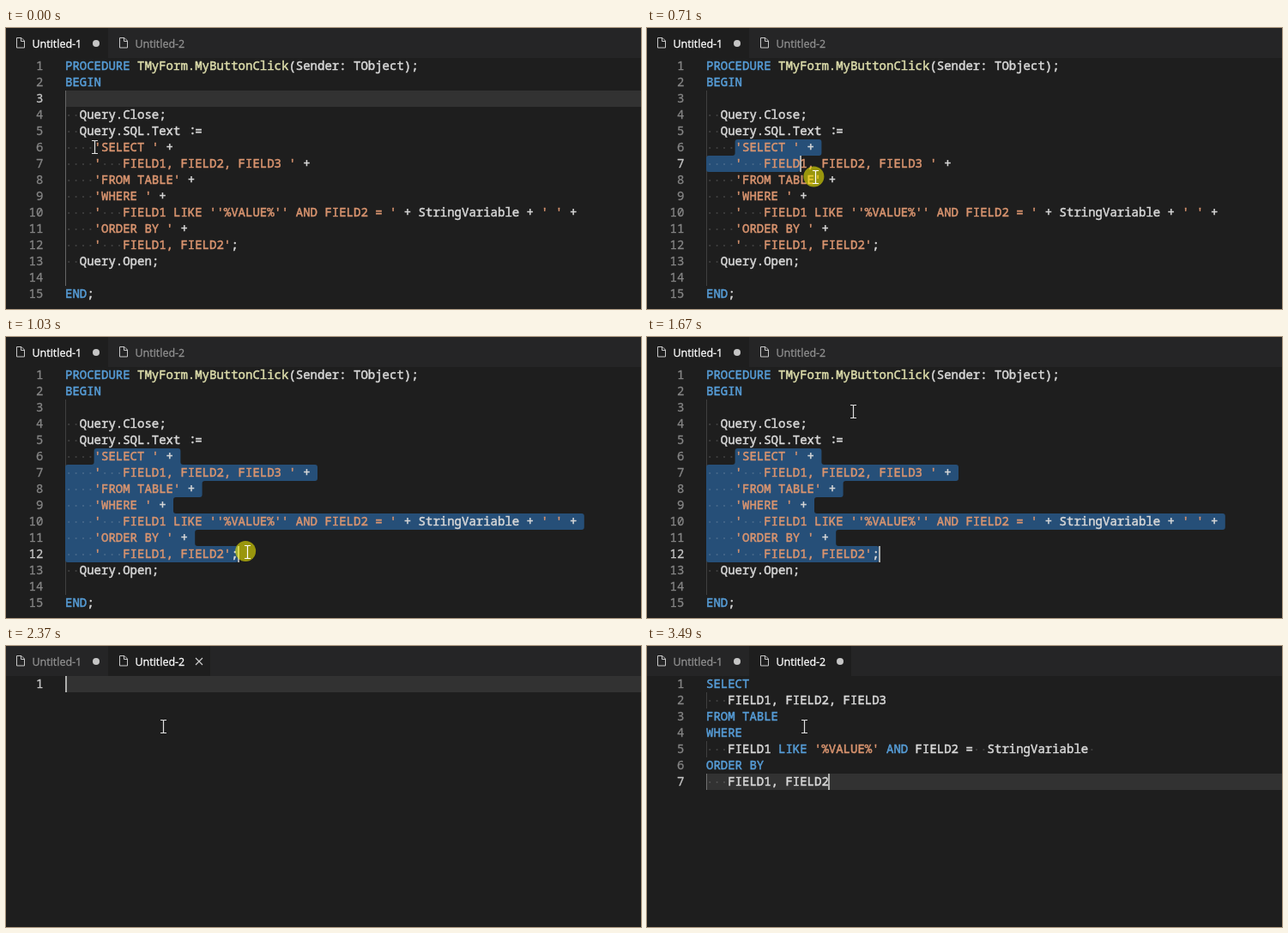
An HTML page that plays this animation: 740 px wide and 328 px high, repeating every 4.29 s.

```html
<!DOCTYPE html>
<html lang="en">
<head>
<meta charset="utf-8">
<title>Editor</title>
<style>
  html, body { margin: 0; width: 100%; height: 100%; overflow: hidden; background: #1e1e1e; }
  svg { display: block; width: 740px; height: 328px; }
  text { white-space: pre; font-variant-ligatures: none; }
  .code { font: 500 14px "Noto Sans Mono", "DejaVu Sans Mono", monospace; }
  .tab { font: 12.5px "Open Sans", "Noto Sans", sans-serif; }
  #texts text { stroke-width: .5; }
  #over text, #tabs text { stroke-width: .3; }
</style>
</head>
<body>
<svg id="stage" viewBox="0 0 740 328">
  <rect width="740" height="328" fill="#1e1e1e"/>
  <g id="tabs"></g>
  <g id="under"></g>
  <g id="texts" class="code"></g>
  <g id="over" class="code"></g>
  <circle id="press" r="12" fill="#faf500" fill-opacity=".56"/>
  <path id="beam" d="M-3.5 -7.5H-1Q0 -7.5 0 -6.5Q0 -7.5 1 -7.5H3.5M0 -7V7M-3.5 7.5H-1Q0 7.5 0 6.5Q0 7.5 1 7.5H3.5" fill="none" stroke="#fff" stroke-width="1.2"/>
  <path id="arrow" d="M0 0V16L3.7 12.6L6.2 18.4L8.6 17.3L6.1 11.7H11Z" fill="#fff" stroke="#000" stroke-width=".8"/>
</svg>
<script>
const LOOP = 4290, LEFT = 69, TOP = 35, ROW = 19, CW = 8.4;
const $ = id => document.getElementById(id);

const query = [
  "'SELECT ' +",
  "    '   FIELD1, FIELD2, FIELD3 ' +",
  "    'FROM TABLE' +",
  "    'WHERE ' +",
  "    '   FIELD1 LIKE ''%VALUE%'' AND FIELD2 = ' + StringVariable + ' ' +",
  "    'ORDER BY ' +",
  "    '   FIELD1, FIELD2';"
];
const docs = [
  ["PROCEDURE TMyForm.MyButtonClick(Sender: TObject);", "BEGIN", "",
   "  Query.Close;", "  Query.SQL.Text :=", "    " + query[0], ...query.slice(1),
   "  Query.Open;", "", "END;"],
  [""],
  query,
  ["SELECT", "   FIELD1, FIELD2, FIELD3", "FROM TABLE", "WHERE",
   "   FIELD1 LIKE '%VALUE%' AND FIELD2 =  StringVariable ", "ORDER BY", "   FIELD1, FIELD2"]
];
const guides = [[2, 13], null, [1, 6], null];

const TOKEN = /'[^']*'|\b(?:PROCEDURE|BEGIN|END|SELECT|FROM|TABLE|WHERE|LIKE|AND|ORDER|BY)\b|TMyForm\.MyButtonClick|[^\s']+?(?=[\s']|$)/g;
const colX = c => LEFT + c * CW;
const rowY = r => TOP + r * ROW;
const rect = (x, y, w, h, fill) => `<rect x="${x}" y="${y}" width="${w}" height="${h}" fill="${fill}"/>`;
const esc = s => s.replace(/&/g, "&amp;").replace(/</g, "&lt;");
const text = (x, y, s, ink, more = "") =>
  `<text x="${x.toFixed(2)}" y="${y}" fill="${ink}" stroke="${ink}" ${more}>${esc(s)}</text>`;

function tint(word) {
  if (word[0] === "'") return "#d9946f";
  if (word.startsWith("TMyForm")) return "#dcdcaa";
  return /^[A-Z]{2,}$/.test(word) ? "#569cd6" : "#d8d8d8";
}

function drawLine(line, r) {
  const y = rowY(r) + 14;
  let out = "";
  for (const m of line.matchAll(TOKEN)) {
    if (m[0] === ":=") {
      out += text(colX(m.index) + 1.5, y - 1, ":", "#d8d8d8") + text(colX(m.index + 1), y, "=", "#d8d8d8");
    } else out += text(colX(m.index), y, m[0], tint(m[0]));
  }
  // dots for leading, trailing and repeated blanks
  for (const m of line.matchAll(/^ +| +$| {2,}/g))
    for (let c = m.index; c < m.index + m[0].length; c++)
      out += `<circle cx="${(colX(c) + CW / 2).toFixed(2)}" cy="${rowY(r) + 10}" r="1.1" fill="#e3e4e2" fill-opacity=".18"/>`;
  return out;
}

$("texts").innerHTML = docs.map(d => `<g>${d.map(drawLine).join("")}</g>`).join("");
const layers = [...$("texts").children];

function selection(doc, from, to) {
  const rows = [];
  for (let r = from.r; r <= to.r; r++) {
    const a = r === from.r ? from.c : 0;
    const b = r === to.r ? to.c : doc[r].length + 1;
    if (b > a) rows.push({ r, a: colX(a), b: colX(b) });
  }
  const R = 3;
  let d = "";
  rows.forEach((s, i) => {
    const p = rows[i - 1], n = rows[i + 1], y = rowY(s.r), e = y + ROW;
    const tl = !p || p.a > s.a ? R : 0, tr = !p || p.b < s.b ? R : 0;
    const br = !n || n.b < s.b ? R : 0, bl = !n || n.a > s.a ? R : 0;
    d += `M${s.a + tl} ${y}H${s.b - tr}q${tr} 0 ${tr} ${tr}V${e - br}q0 ${br} ${-br} ${br}H${s.a + bl}q${-bl} 0 ${-bl} ${-bl}V${y + tl}q0 ${-tl} ${tl} ${-tl}Z`;
    if (p && p.b > s.b) d += `M${s.b} ${y}h${R}q${-R} 0 ${-R} ${R}Z`;
    if (n && n.b > s.b) d += `M${s.b} ${e}h${R}q${-R} 0 ${-R} ${-R}Z`;
    if (n && n.a < s.a) d += `M${s.a} ${e}h${-R}q${R} 0 ${R} ${-R}Z`;
  });
  return `<path d="${d}" fill="#264f78"/>`;
}

// pointer route: time, x, y
const route = [
  [0, 103, 139], [460, 103, 139], [710, 196, 174], [850, 252, 289], [945, 267, 240],
  [1030, 281, 251], [1120, 293, 258], [1340, 293, 258], [1670, 240, 87], [1850, 210, 56],
  [2010, 180, 22], [2110, 180, 22], [2370, 183, 94], [LOOP, 183, 94]
];

function slope(i, k) {
  const a = route[i - 1], b = route[i], c = route[i + 1];
  if (!a || !c || (b[k] - a[k]) * (c[k] - b[k]) <= 0) return 0;
  return (c[k] - a[k]) / (c[0] - a[0]);
}

function pointer(t) {
  let i = 0;
  while (i < route.length - 2 && t >= route[i + 1][0]) i++;
  const a = route[i], b = route[i + 1], len = b[0] - a[0], s = (t - a[0]) / len;
  const s2 = s * s, s3 = s2 * s;
  return [1, 2].map(k => a[k] + (b[k] - a[k]) * (3 * s2 - 2 * s3)
    + len * ((s3 - 2 * s2 + s) * slope(i, k) + (s3 - s2) * slope(i + 1, k)));
}

function caretAt([x, y], doc) {
  const r = Math.max(0, Math.min(doc.length - 1, Math.floor((y - TOP) / ROW)));
  return { r, c: Math.max(0, Math.min(doc[r].length, Math.round((x - LEFT) / CW))) };
}

function tab(i, active, mark) {
  const x = i * 120;
  let out = active ? rect(i * 119, 0, 119, TOP, "#1e1e1e") : "";
  out += `<path d="M${x + 12.5} 11.5h5.5l3.5 3.5v8h-9zM${x + 17.5} 11.5v4h4" fill="none" stroke="#c8c8c8"/>`;
  out += text(x + 30.5, 22.5, "Untitled-" + (i + 1), active ? "#ffffff" : "#919191", 'class="tab"');
  if (mark === "dot") out += `<circle cx="${x + 105}" cy="18" r="4" fill="#c5c5c5"/>`;
  if (mark === "close") out += `<path d="M${x + 101} 14l8 8m0 -8l-8 8" stroke="#d0d0d0" stroke-width="1.1"/>`;
  return out;
}

const show = (el, on) => el.style.display = on ? "" : "none";

function draw(t) {
  const scene = t < 2060 ? 0 : t < 2710 ? 1 : t < 3490 ? 2 : 3;
  const doc = docs[scene], last = doc.length - 1;
  const start = { r: 5, c: 4 };
  let caret = { r: last, c: doc[last].length }, picked = false;
  if (scene === 0) {
    caret = t < 480 ? { r: 2, c: 0 } : caretAt(pointer(Math.min(t, 1100) - 40), doc);
    picked = t >= 480 && (caret.r > start.r || caret.c > start.c);
  }

  $("tabs").innerHTML = rect(0, 0, 740, TOP, "#252526")
    + tab(0, scene === 0, "dot")
    + tab(1, scene > 0, scene === 0 ? "" : t < 2740 ? "close" : "dot");

  let under = picked ? "" : rect(LEFT, rowY(caret.r), 740 - LEFT, ROW, "#323232");
  const g = guides[scene];
  if (g) under += rect(LEFT, rowY(g[0]), 1, (g[1] - g[0] + 1) * ROW, picked ? "#404040" : "#666666");
  if (scene === 3)
    for (const r of [1, 4, 6]) under += rect(LEFT, rowY(r), 1, ROW, r === 6 ? "#707070" : "#404040");
  if (picked) under += selection(doc, start, caret);
  $("under").innerHTML = under;

  layers.forEach((el, i) => show(el, i === scene));

  let over = doc.map((_, r) => text(43.4, rowY(r) + 14, String(r + 1),
    r === caret.r ? "#c6c6c6" : "#858585", 'text-anchor="end"')).join("");
  if (t >= 480) over += rect(Math.floor(colX(caret.c)), rowY(caret.r), 2, ROW, "#aeafad");
  $("over").innerHTML = over;

  const [x, y] = pointer(t);
  const held = t >= 460 && t < 1070 || t >= 2030 && t < 2120;
  const onTabs = y < TOP;
  show($("press"), held);
  show($("beam"), !onTabs);
  show($("arrow"), onTabs);
  $("press").setAttribute("transform", `translate(${x - 2} ${y - 1})`);
  $("beam").setAttribute("transform", `translate(${Math.round(x) + .5} ${Math.round(y)})`);
  $("beam").style.mixBlendMode = held ? "normal" : "difference";
  $("arrow").setAttribute("transform", `translate(${x} ${y})`);
}

const began = performance.now();
function tick() {
  draw((performance.now() - began) % LOOP);
  requestAnimationFrame(tick);
}
tick();
</script>
</body>
</html>
```
